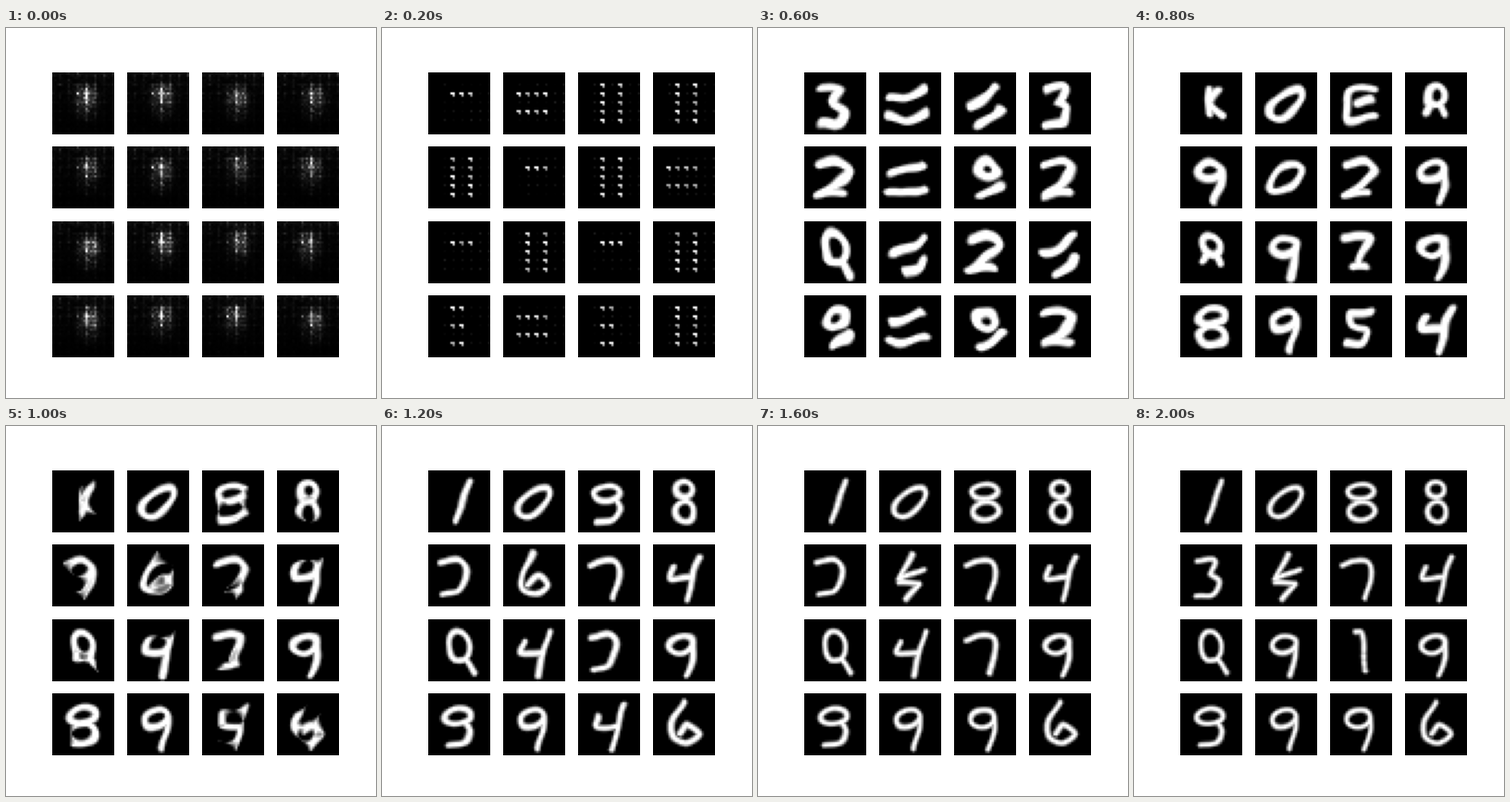
Animation, 400 px wide and 400 px high, one loop 2100 ms. Source, as a matplotlib script:

```python
import numpy as np
import matplotlib.pyplot as plt
from matplotlib.animation import FuncAnimation

FRAMES, STEP = 21, 100
N, SIDE = 28, 66.96
rng = np.random.default_rng(7)
row, col = np.mgrid[0:N, 0:N]
py, px = (row + 0.5) * SIDE / N, (col + 0.5) * SIDE / N


def arc(cx, cy, rx, ry, tilt=0):
    """Closed loop, tilted in degrees."""
    a, t = np.linspace(0, 2 * np.pi, 60), np.radians(tilt)
    x, y = rx * np.cos(a), ry * np.sin(a)
    return np.c_[cx + x * np.cos(t) - y * np.sin(t),
                 cy + x * np.sin(t) + y * np.cos(t)]


def line(*xy):
    """Straight segments through the points."""
    p = np.reshape(xy, (-1, 2)).astype(float)
    s = np.linspace(0, len(p) - 1, 20 * len(p))
    return np.c_[[np.interp(s, range(len(p)), c) for c in p.T]].T


def curve(*xy):
    """Catmull-Rom curve through the points."""
    p = np.reshape(xy, (-1, 2)).astype(float)
    q = np.vstack([2 * p[0] - p[1], p, 2 * p[-1] - p[-2]])
    t = np.linspace(0, 1, 14)[:, None]
    return np.vstack([
        b + 0.5 * t * (c - a + t * (2 * a - 5 * b + 4 * c - d
                                    + t * (3 * (b - c) + d - a)))
        for a, b, c, d in zip(q, q[1:], q[2:], q[3:])])


# skeletons, in pixels of one cell
SHAPES = {
    "0": [arc(33, 34, 20, 11, -42)],
    "1": [curve(44, 11, 38, 32, 29, 55)],
    "l": [curve(27, 14, 35, 18, 38, 56)],
    "2": [curve(18, 19, 40, 17, 47, 26, 34, 42, 17, 52), line(20, 52, 42, 50)],
    "3": [curve(19, 18, 38, 17, 32, 33), curve(32, 33, 42, 40, 36, 55, 18, 56)],
    "4": [curve(23, 25, 20, 37, 43, 35), curve(50, 13, 44, 32, 37, 60)],
    "h": [line(36, 11, 21, 38, 48, 27), line(22, 41, 44, 42, 29, 60)],
    "5": [curve(46, 18, 25, 20, 24, 32, 38, 37, 34, 50, 18, 52)],
    "6": [curve(33, 10, 21, 32, 22, 49, 36, 54, 49, 43, 38, 34, 28, 44)],
    "7": [curve(13, 22, 26, 18, 42, 20, 44, 38, 38, 59)],
    "J": [curve(14, 19, 34, 17, 41, 28, 34, 50, 17, 54)],
    "8": [arc(33, 21, 9, 8), arc(35, 45, 10, 11)],
    "B": [arc(34, 23, 14, 8), arc(34, 44, 14, 10)],
    "9": [arc(31, 27, 13, 9, -15), curve(44, 26, 43, 42, 37, 60)],
    "g": [arc(32, 25, 14, 8), curve(41, 31, 45, 42, 38, 54, 21, 55)],
    "Q": [arc(33, 29, 11, 16), curve(30, 45, 41, 44, 51, 57)],
    "E": [curve(49, 19, 24, 18, 17, 46, 26, 52, 47, 48), line(29, 33, 45, 30)],
    "K": [line(41, 18, 32, 33, 44, 46), line(32, 18, 31, 45)],
    "R": [arc(33, 26, 9, 10), line(28, 36, 25, 44), line(38, 35, 44, 45)],
    "Z": [line(15, 17, 42, 17, 32, 44), line(25, 49, 39, 49)],
    "=": [curve(12, 28, 28, 26, 46, 19), curve(12, 48, 30, 51, 51, 45)],
    ">": [curve(46, 17, 38, 26, 17, 35), curve(49, 40, 43, 49, 28, 55)],
    "e": [arc(35, 26, 10, 9), curve(50, 42, 43, 48, 30, 54)],
}

# what the sixteen cells look like, row by row
POSES = {6: "3=>3" "2=e2" "Q>2>" "e=e2",
         8: "K0ER" "9029" "R9Z9" "B954",
         12: "10g8" "J674" "Q4J9" "g946",
         16: "10B8" "Jh74" "Q479" "g996",
         20: "10B8" "3h74" "Q9l9" "g996"}
SEEDS = "-=||" "|-|=" "-|-|" "E=E|"
LATTICE = {"-": ([9], [11, 15, 19]),
           "=": ([9, 17], [7, 11, 15, 19]),
           "|": ([5, 9, 13, 17, 21], [11, 19]),
           "E": ([5, 13, 21], [11, 15])}

phases = rng.uniform(0, 2 * np.pi, (16, 4))
weave = (np.where(col % 4 == 3, 1, 0.4) * np.where(row % 4 == 1, 1, 0.55)
         * rng.uniform(0.2, 1.2, (N, N)))


def early(n):
    """1 for the first rough glyphs, falling towards 0."""
    return np.exp((6 - n) / 5)


def distance(i, key):
    """Distance to a skeleton, seen through a wobble that calms down."""
    a, b, c, d = phases[i]
    amp = 0.5 + 1.2 * early(key)
    x = px + amp * (np.sin(py / 7 + a) + 0.6 * np.sin(px / 4 + b))
    y = py + amp * (np.sin(px / 7 + c) + 0.6 * np.sin(py / 4 + d))
    p = np.vstack(SHAPES[POSES[key][i]])
    return np.hypot(x[..., None] - p[:, 0], y[..., None] - p[:, 1]).min(-1)


def haze():
    """Woven noise with a glow in the upper middle."""
    cx, cy, gain = rng.normal(15.5, 0.9), rng.normal(8.5, 1), rng.uniform(0.9, 1.8)
    glow = np.exp(-((col - cx) / 3.8) ** 2 - ((row - cy) / 3.5) ** 2)
    tail = 0.45 * np.exp(-((col - cx) / 4) ** 2 - ((row - cy - 5) / 5) ** 2)
    base = 0.16 * np.exp(-row / 12) + 0.2 * (row == 0) + 0.1 * (col == 0)
    grain = weave * rng.uniform(0.5, 1.4, (N, N))
    return np.clip((gain * (glow + tail) + base) * grain, 0, 1)


def dots(kind):
    """Small bright marks on a four-step lattice."""
    img = np.zeros((N, N))
    img[5:24:4, 7::4] = 0.12 * rng.random((5, 6))
    rows, cols = LATTICE[kind]
    for r in rows:
        for c in cols:
            level = rng.uniform(0.6, 1.1)
            img[r, c - 1:c + 1] = level
            img[r + 1, c] = 0.7 * level
    return np.clip(img, 0, 1)


fields = {k: [distance(i, k) for i in range(16)] for k in POSES}
hazes = [haze() for _ in SEEDS]
seeds = [dots(kind) for kind in SEEDS]


def glyph(i, n):
    """Glyph i at time n, melting from one pose into the next."""
    a = max(k for k in POSES if k <= n)
    b = min(k for k in POSES if k >= n)
    t = (n - a) / max(b - a, 1)
    d = ((1 - t) * np.sqrt(fields[a][i]) + t * np.sqrt(fields[b][i])) ** 2
    width = 2.6 + 2.4 * early(n)
    return np.clip(0.5 + (width - d) / 3.4, 0, 1)


def picture(i, n):
    if n < 2:
        return (1 - n / 2) * hazes[i] + n / 2 * seeds[i]
    if n < 6:
        t = (n - 2) / 4
        grown = glyph(i, 6) * np.clip(1.6 * t * (t + (1 - t) * 2 * weave), 0, 1)
        return np.maximum((1 - t) * seeds[i], grown)
    return glyph(i, n)


fig, axes = plt.subplots(4, 4, figsize=(4, 4), dpi=100)
views = []
for ax in axes.flat:
    views.append(ax.imshow(np.zeros((N, N)), cmap="gray", vmin=0, vmax=1))
    ax.axis("off")


def update(n):
    for i, view in enumerate(views):
        view.set_data(picture(i, n))
    return views


anim = FuncAnimation(fig, update, frames=FRAMES, interval=STEP, repeat=True)
plt.show()
```
